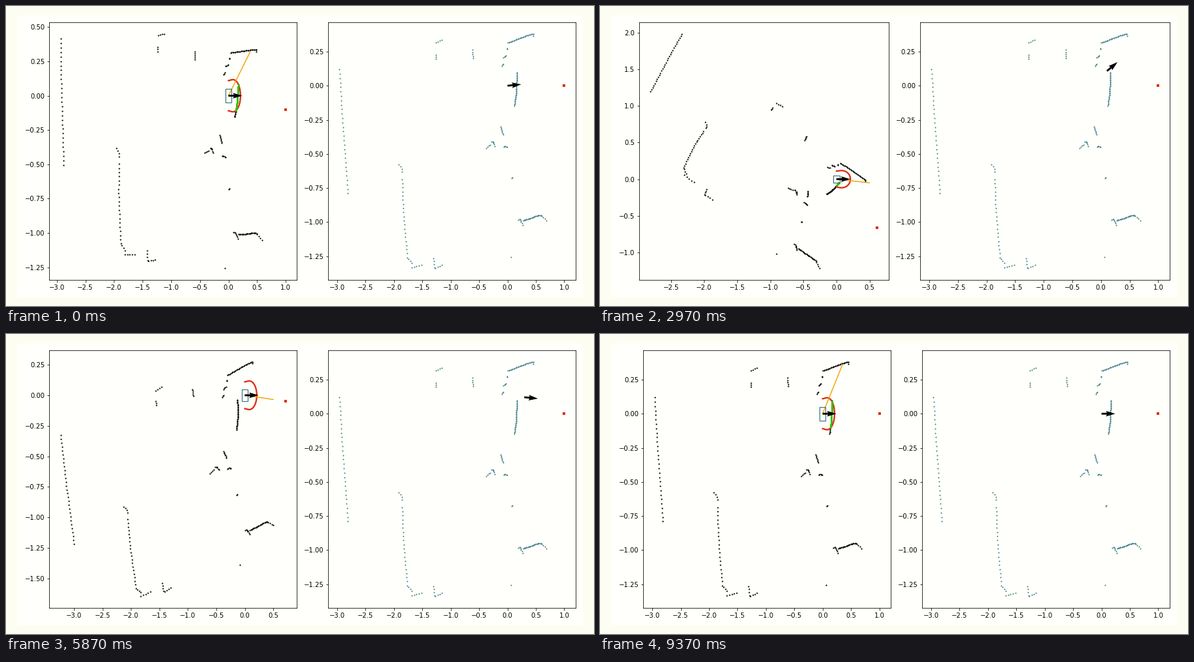
Recreate the animation shown at these times as a matplotlib script. Size 900x460 px, loop 9.43 s.

```python
import numpy as np
import matplotlib.pyplot as plt
from matplotlib.animation import FuncAnimation
from matplotlib.patches import Rectangle

W, H, DPI = 900, 460, 72
FRAMES, INTERVAL = 230, 41
PAPER, BORDER = "#fffffb", "#fdfdf2"
TEAL, RED, GREEN, ORANGE = "#3a7a85", "#dc2f10", "#2fc40c", "#f2a50c"

GOAL = np.array([1.0, 0.0])
TURN, STEP, REACH = 0.1, 0.05, 0.5

# Scanned outlines: number of dots, then the corners of the path.
WALLS = [
    (29, (-2.96, .12), (-2.915, -.22), (-2.86, -.53), (-2.815, -.79)),
    (4, (-1.915, -.576), (-1.865, -.60), (-1.856, -.63)),
    (20, (-1.856, -.686), (-1.839, -.896), (-1.804, -1.087), (-1.765, -1.26)),
    (3, (-1.745, -1.272), (-1.685, -1.30)),
    (5, (-1.688, -1.332), (-1.517, -1.316)),
    (4, (-1.305, -1.264), (-1.287, -1.333)),
    (4, (-1.27, -1.336), (-1.155, -1.316)),
    (28, (.008, .315), (.35, .37), (.45, .38)),
    (34, (.164, .097), (.158, 0), (.148, -.07), (.121, -.145)),
    (24, (.275, -.987), (.40, -.972), (.52, -.953), (.59, -.948)),
]
CLUSTERS = [
    (4, (-1.263, .317), (-1.16, .336)),
    (3, (-1.265, .228), (-1.262, .197)),
    (5, (-.619, .262), (-.608, .203)),
    (2, (.45, .38), (.454, .366)),
    (2, (-.012, .274), (-.008, .268)),
    (4, (-.072, .208), (-.03, .222)),
    (3, (-.102, .145), (-.074, .16)),
    (7, (-.122, -.299), (-.08, -.356)),
    (4, (-.377, -.456), (-.308, -.433)),
    (3, (-.28, -.411), (-.25, -.413)),
    (3, (-.245, -.42), (-.222, -.442)),
    (5, (-.067, -.449), (-.04, -.443), (-.008, -.45)),
    (2, (.073, -.677), (.08, -.674)),
    (4, (.186, -.982), (.215, -.975), (.232, -.991)),
    (3, (.24, -.998), (.267, -1.02)),
    (4, (.60, -.955), (.687, -.987)),
    (1, (.065, -1.254), (.065, -1.254)),
]

# When each move happens: L / R turn, F steps forward, 0 goes home.
MOVES = "LLLLLLLLFFFRRFRRRRRRRFFFFFFFFRFFFFFF0"
TIMES = [0, 330, 670, 1000, 1200, 1400, 1670, 1930, 2200, 2470, 2700, 2970,
         3230, 3470, 3700, 3930, 4100, 4400, 4700, 4930, 5170, 5400, 5630,
         5870, 6100, 6330, 6570, 6770, 6970, 7190, 7430, 7670, 7930, 8270,
         8500, 8700, 8870]


def dots(n, *corners):
    """Spread n dots evenly along a path, as seen on screen."""
    p = np.array(corners, float)
    seg = np.hypot(*(np.diff(p, axis=0) * [1, 2.4]).T)
    s = np.concatenate([[0], np.cumsum(seg)])
    u = np.linspace(0, s[-1], n)
    return np.column_stack([np.interp(u, s, p[:, 0]), np.interp(u, s, p[:, 1])])


def clearance(angle):
    return 0.11 + 0.1 * np.cos(angle) ** 2


def polar(r, angle):
    return np.column_stack([r * np.cos(angle), r * np.sin(angle)])


def to_robot(points, pos, heading):
    c, s = np.cos(heading), np.sin(heading)
    return (points - pos) @ np.array([[c, -s], [s, c]])


def plan():
    """Pose after every move."""
    poses, pos, heading = [], np.zeros(2), 0.0
    for move in MOVES:
        if move == "F":
            pos = pos + STEP * np.array([np.cos(heading), np.sin(heading)])
        elif move == "0":
            pos, heading = np.zeros(2), 0.0
        else:
            heading += TURN if move == "L" else -TURN
        poses.append((pos, heading))
    return poses


def beam_tip(t, pos, heading):
    """Free direction ahead: around the wall first, then to the goal."""
    if t < 2700 or t >= 8870:
        return polar(REACH, np.array([0.8 - heading]))[0]
    if t < 3470:
        return polar(REACH, np.array([0.6 - heading]))[0]
    goal = to_robot(GOAL, pos, heading)
    return goal * min(1, REACH / np.hypot(*goal))


SCAN = np.vstack([dots(*w) for w in WALLS + CLUSTERS])
ARC_ANGLES = np.linspace(-np.pi / 2, np.pi / 2, 60)
ARC = polar(clearance(ARC_ANGLES), ARC_ANGLES)
POSES = plan()

fig = plt.figure(figsize=(W / DPI, H / DPI), dpi=DPI, facecolor=BORDER)
fig.add_artist(Rectangle((17 / W, 13 / H), 866 / W, 433 / H,
                         color=PAPER, lw=0, zorder=-1))
local = fig.add_axes([0.07, 0.09, 0.42, 0.85], facecolor=PAPER)
world = fig.add_axes([0.55, 0.09, 0.42, 0.85], facecolor=PAPER)


def marks(ax, color, size, shape="o", **kw):
    return ax.plot([], [], shape, color=color, ms=size, mew=0, **kw)[0]


def arrow(ax):
    return ax.quiver([0], [0], [1], [0], scale=18, width=0.0075,
                     color="black", zorder=6)


seen = marks(local, "black", 2.2)
local.plot(*ARC.T, color=RED, lw=2.3, zorder=3)
near = marks(local, GREEN, 3, zorder=4)
beam, = local.plot([], [], color=ORANGE, lw=1.5, zorder=4)
goal_mark = marks(local, RED, 4.6, "s")
local.add_patch(Rectangle((-0.05, -0.05), 0.1, 0.1, fill=False,
                          ec="#2f6f76", lw=1.1, zorder=5))
arrow(local)

marks(world, TEAL, 2).set_data(*SCAN.T)
marks(world, RED, 4.6, "s").set_data([GOAL[0]], [GOAL[1]])
robot = arrow(world)


def fit(ax, points):
    lo, hi = points.min(axis=0), points.max(axis=0)
    pad = 0.05 * (hi - lo)
    ax.set_xlim(lo[0] - pad[0], hi[0] + pad[0])
    ax.set_ylim(lo[1] - pad[1], hi[1] + pad[1])


def overhang(ticks, lim, length, half):
    """How far the last tick label sticks out past its axis."""
    inside = ticks[ticks <= lim[1]]
    gap = (lim[1] - inside[-1]) / (lim[1] - lim[0]) * length
    return max(0, half - gap)


def arrange():
    """Tight margins around both plots, following the label widths."""
    yticks = local.get_yticks()
    step = yticks[1] - yticks[0]
    left = 66.4 if abs(step - 0.25) < 0.01 else 60.0
    top = 24.8 + overhang(yticks, local.get_ylim(), 395, 3.8)
    gap = 48.4 + overhang(local.get_xticks(), local.get_xlim(), 380, 8)
    right, bottom = 871.7, 419.6
    width = (right - left - gap) / 2
    for ax, x in ((local, left), (world, right - width)):
        ax.set_position([x / W, 1 - bottom / H, width / W, (bottom - top) / H])


fit(world, np.vstack([SCAN, GOAL]))


def update(i):
    t = i * INTERVAL + INTERVAL // 2
    pos, heading = POSES[np.searchsorted(TIMES, t, side="right") - 1]

    scan = to_robot(SCAN, pos, heading)
    goal = to_robot(GOAL, pos, heading)
    tip = beam_tip(t, pos, heading)
    r, angle = np.hypot(*scan.T), np.arctan2(scan[:, 1], scan[:, 0])
    close = (scan[:, 0] > 0) & (r < clearance(angle))

    seen.set_data(*scan.T)
    near.set_data(*scan[close].T)
    beam.set_data([0, tip[0]], [0, tip[1]])
    goal_mark.set_data([goal[0]], [goal[1]])
    robot.set_offsets([pos])
    robot.set_UVC([np.cos(heading)], [np.sin(heading)])

    fit(local, np.vstack([scan, goal, tip, ARC]))
    arrange()
    return seen, near, beam, goal_mark, robot


anim = FuncAnimation(fig, update, frames=FRAMES, interval=INTERVAL,
                     repeat=True, blit=False)
plt.show()
```
